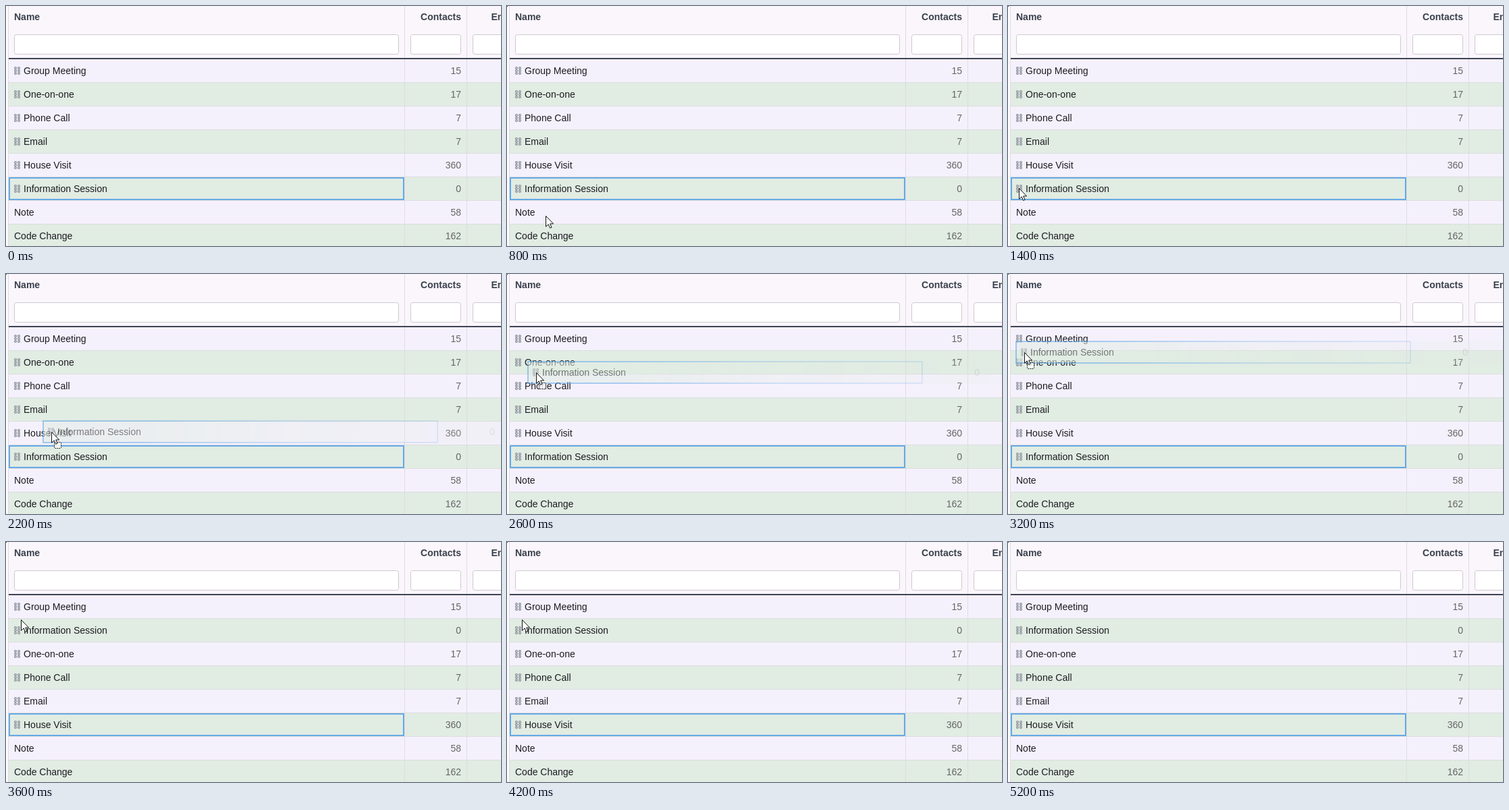
These frames come from a looping animation (732 px wide and 356 px high, 6 s). An HTML page:

```html
<!DOCTYPE html>
<html lang="en">
<head>
<meta charset="utf-8">
<title>Row reordering</title>
<style>
  html, body { margin: 0; width: 100%; height: 100%; overflow: hidden; background: #fdfbfe; }
  svg { display: block; }
  text { font: 14px "Liberation Sans", Arial, sans-serif; fill: #1c1c20; }
  .head { font-weight: bold; fill: #3a404c; }
  .num { text-anchor: end; fill: #666; }
  .field { fill: #fff; stroke: #cdcacf; }
  .line { fill: #dcdde0; }
  .focus { fill: none; stroke: #66a9e6; stroke-width: 2; }
  .dot { fill: #c9ccd2; stroke: #8b9099; stroke-width: 1.1; }

  .step { animation: 6s step-end infinite; }
  #corner { animation-name: corner; }
  #before { animation-name: before; }
  #after { animation-name: after; }
  #pointer { animation-name: move; }
  .drag { animation-name: drag; }

  @keyframes corner { 0% { opacity: 0 } 6.666%, 100% { opacity: 1 } }
  @keyframes before { 0% { visibility: visible } 60%, 100% { visibility: hidden } }
  @keyframes after { 0% { visibility: hidden } 60%, 100% { visibility: visible } }
  @keyframes drag {
    0% { opacity: 0 }
    33.333% { opacity: 1 }
    60%, 100% { opacity: 0 }
  }
  @keyframes move {
    0% { transform: translate(-900px, 0) }
    13.333% { transform: translate(57px, 311px) }
    16.666% { transform: translate(36px, 287px) }
    20% { transform: translate(17px, 268px) }
    23.333% { transform: translate(16px, 270px) }
    33.333% { transform: translate(48px, 257px) }
    36.666% { transform: translate(67px, 234px) }
    40% { transform: translate(66px, 194px) }
    43.333% { transform: translate(43px, 146px) }
    46.666% { transform: translate(30px, 114px) }
    50% { transform: translate(28px, 114px) }
    53.333% { transform: translate(24px, 116px) }
    60% { transform: translate(22px, 115px) }
    76.666% { transform: translate(36px, 122px) }
    80% { transform: translate(76px, 194px) }
    83.333% { transform: translate(102px, 258px) }
    86.666%, 100% { transform: translate(-900px, 0) }
  }
</style>
</head>
<body>
<svg width="732" height="356" viewBox="0 0 732 356">
  <defs>
    <radialGradient id="fade" gradientUnits="userSpaceOnUse" cx="17" cy="271" r="700">
      <stop offset="0" stop-color="#fff" stop-opacity=".6"/>
      <stop offset=".2" stop-color="#fff" stop-opacity=".52"/>
      <stop offset=".5" stop-color="#fff" stop-opacity=".28"/>
      <stop offset="1" stop-color="#fff" stop-opacity=".14"/>
    </radialGradient>
    <mask id="veil" maskUnits="userSpaceOnUse" x="0" y="250" width="740" height="42">
      <rect y="250" width="740" height="42" fill="url(#fade)"/>
    </mask>
    <g id="grip"></g>
  </defs>

  <rect x="4" width="728" height="77" fill="#faf6fc"/>
  <g id="stripes"></g>
  <rect class="line" x="3" width="1" height="356"/>
  <rect class="line" x="589" width="1" height="356"/>
  <rect class="line" x="681" width="1" height="356"/>
  <rect x="4" y="77" width="728" height="2" fill="#3f4452"/>

  <text class="head" x="12" y="21">Name</text>
  <text class="head num" style="fill:#3a404c" x="673" y="21">Contacts</text>
  <text class="head" x="717.5" y="21">En</text>
  <rect class="field" x="12.5" y="42.5" width="568" height="29" rx="3"/>
  <rect class="field" x="598.5" y="42.5" width="74" height="29" rx="3"/>
  <rect class="field" x="690.5" y="42.5" width="74" height="29" rx="3"/>

  <g id="before" class="step"></g>
  <g id="after" class="step"></g>
  <rect class="focus" x="5" y="255" width="583" height="32"/>
  <rect id="corner" class="step" width="1" height="1" fill="#111"/>

  <g id="pointer" class="step">
    <g class="drag step">
      <g transform="translate(-17 -271)">
        <g mask="url(#veil)">
          <rect x="4" y="254" width="728" height="34" fill="#e1ece3"/>
          <g id="ghost"></g>
          <rect class="focus" x="5" y="255" width="583" height="32"/>
        </g>
      </g>
      <rect x="4.5" y="15.5" width="10" height="9" rx="1" fill="#fff" fill-opacity=".8" stroke="#222" stroke-dasharray="2 1"/>
    </g>
    <path d="M.5 .5V16.3L4.2 12.9 6.6 18.4 9 17.4 6.7 12H11.6Z" fill="#fff" stroke="#111"/>
  </g>
</svg>
<script>
  const rows = [
    ["Group Meeting", 15], ["One-on-one", 17], ["Phone Call", 7], ["Email", 7],
    ["House Visit", 360], ["Information Session", 0], ["Note", 58], ["Code Change", 162]
  ];
  const fixedFrom = 6; // rows from here on have no grip
  const put = (id, html) => document.getElementById(id).innerHTML = html;

  const rowMarkup = ([name, count], i) => {
    const y = 101 + 35 * i, movable = i < fixedFrom;
    return (movable ? `<use href="#grip" y="${y - 5}"/>` : "") +
      `<text x="${movable ? 26 : 12}" y="${y}">${name}</text>` +
      `<text class="num" x="673" y="${y}">${count}</text>`;
  };

  let dots = "";
  for (const x of [14, 19])
    for (const y of [-4, 0, 4]) dots += `<circle class="dot" cx="${x}" cy="${y}" r="1.5"/>`;
  put("grip", dots);

  put("stripes", rows.map((_, i) => {
    const y = 79 + 35 * i;
    return `<rect x="4" y="${y}" width="728" height="34" fill="${i % 2 ? "#e1ece3" : "#f5f1fc"}"/>` +
      `<rect class="line" x="4" y="${y + 34}" width="728" height="1"/>`;
  }).join(""));

  const moved = rows.slice();
  moved.splice(1, 0, moved.splice(5, 1)[0]);
  put("before", rows.map(rowMarkup).join(""));
  put("after", moved.map(rowMarkup).join(""));
  put("ghost", rowMarkup(rows[5], 5));
</script>
</body>
</html>
```
